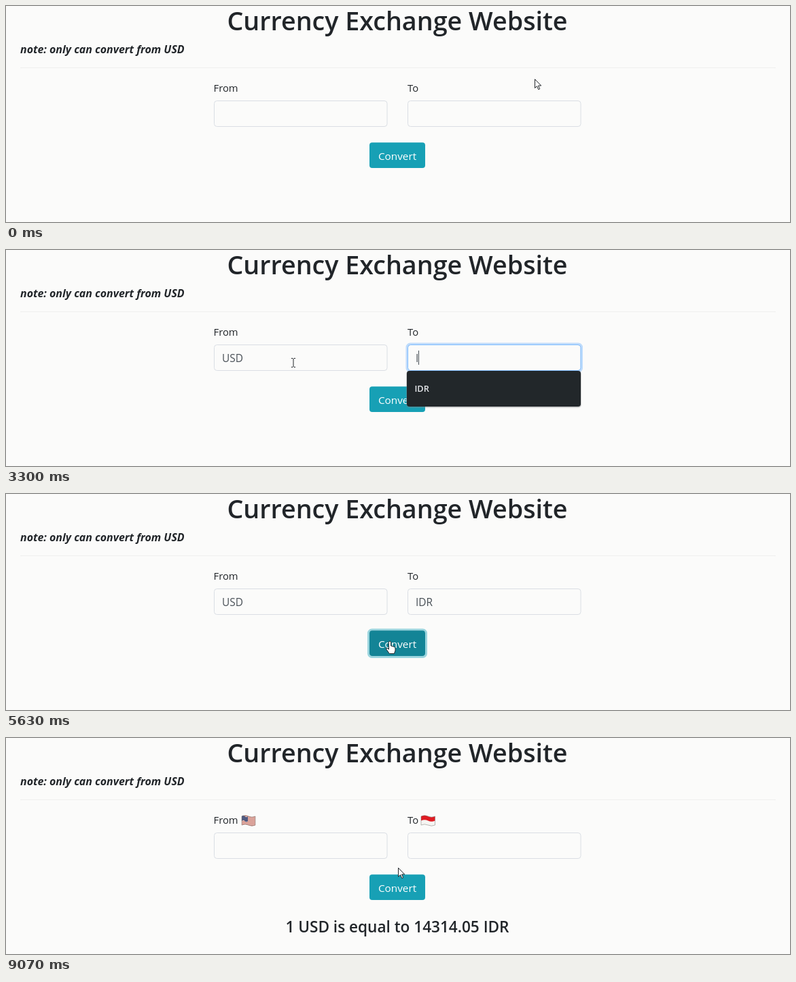
These frames come from a looping animation (1154 px wide and 320 px high, 9110 ms). An HTML page:

```html
<!DOCTYPE html>
<html lang="en">
<head>
<meta charset="utf-8">
<title>Currency Exchange</title>
<style>
  html, body { margin: 0; width: 100%; height: 100%; overflow: hidden; background: #fbfbfa; }
  svg { display: block; font: 14.8px "Open Sans", "Noto Sans", sans-serif; fill: #212529; }
  .title { font-size: 37.7px; font-weight: 600; text-anchor: middle; }
  .note { font-size: 15.95px; font-weight: 700; font-style: italic; }
  .result { font-size: 22.6px; font-weight: 600; text-anchor: middle; }
  .typed { font-size: 15.4px; fill: #495057; }
  .convert { font-size: 15.3px; fill: #fff; text-anchor: middle; }
  .item { font-size: 12.7px; font-weight: 600; fill: #e8eaed; }
  .box { fill: none; stroke: #dadee4; }
  .ring { fill: none; stroke-width: 3; }
  .cursor { fill: #fff; stroke: #212529; stroke-linejoin: round; }
</style>
</head>
<body>
<svg id="stage" width="1154" height="320" viewBox="0 0 1154 320">
  <text class="title" x="576" y="36">Currency Exchange Website</text>
  <text class="note" x="21" y="70">note: only can convert from USD</text>
  <path d="M21 91.5H1133" stroke="#efefee"/>
  <text x="305.5" y="127">From</text>
  <text x="591" y="127">To</text>
</svg>
<script>
const LOOP = 9110;
const OPEN = 850, TAB = 2900, CLICK = 5300, DONE = 7900;
const HOVER = [4530, 8830];
const BLINK = 530, FADE = 80;

const fields = [
  { x: 306, focus: [OPEN, TAB], keys: [1950, 2130, 2320], word: "USD" },
  { x: 591, focus: [TAB, CLICK], keys: [3200, 3430, 3650], word: "IDR" }
];
const lists = [
  { x: 305.5, from: OPEN, to: 1950, items: ["USD", "IDR", "MYR", "USA"] },
  { x: 305.5, from: 1950, to: 2320, items: ["USD", "USA"], fade: true },
  { x: 590, from: 3210, to: 3650, items: ["IDR"], fade: true }
];
// time, x, y of the pointer's hot spot
const track = [
  [0, 778, 108], [60, 778, 108], [740, 423, 167], [3850, 423, 167],
  [4530, 555, 207], [4700, 555, 207], [5150, 565, 218],
  [8600, 565, 218], [9030, 577, 192], [LOOP, 577, 192]
];

const stage = document.getElementById("stage");
function add(tag, attrs, parent = stage, text = "") {
  const el = document.createElementNS("http://www.w3.org/2000/svg", tag);
  for (const key in attrs) el.setAttribute(key, attrs[key]);
  el.textContent = text;
  parent.append(el);
  return el;
}
const set = (el, key, value) => el.setAttribute(key, value);
const clamp = v => Math.max(0, Math.min(1, v));
const within = (t, [a, b]) => t >= a && t < b;
const show = (el, on) => set(el, "visibility", on ? "visible" : "hidden");
// rises after a and falls after b, each over 150 ms
const pulse = (t, [a, b]) => clamp((t - a) / 150) - clamp((t - b) / 150);
const mix = (a, b, p) => `rgb(${a.map((v, i) => Math.round(v + (b[i] - v) * p))})`;

for (const f of fields) {
  add("rect", { class: "box", x: f.x + .5, y: 140.5, width: 254.5, height: 38, rx: 4 });
  f.ring = add("g", {});
  add("rect", { class: "ring", x: f.x - 1, y: 139, width: 257.5, height: 41, rx: 5, stroke: "#bfdcfb" }, f.ring);
  add("rect", { class: "box", x: f.x + .5, y: 140.5, width: 254.5, height: 38, rx: 4, style: "stroke:#80bdff" }, f.ring);
  f.text = add("text", { class: "typed", x: f.x + 12, y: 166 });
  f.caret = add("path", { stroke: "#495057" });
}

const buttonRing = add("rect", { class: "ring", x: 533.5, y: 201, width: 85, height: 40.5, rx: 5, stroke: "#9bd5de" });
const button = add("rect", { x: 535, y: 202.3, width: 82, height: 37.7, rx: 4 });
add("text", { class: "convert", x: 576, y: 228 }, stage, "Convert");

const outcome = add("g", {});
add("text", { class: "result", x: 576, y: 288 }, outcome, "1 USD is equal to 14314.05 IDR");
const wave = (x, y, w, h, fill) => add("path", {
  d: `M${x} ${y}q${w / 4} -2.4 ${w / 2} 0t${w / 2} 0v${h}q${-w / 4} 2.4 ${-w / 2} 0t${-w / 2} 0z`, fill
}, outcome);
wave(347, 116, 20, 13, "#f1eeea");
for (let i = 0; i < 7; i++) wave(347, 116 + i * 2, 20, 1, "#c4584a");
wave(347, 116, 9, 7, "#505a80");
wave(611, 116, 20.5, 13, "#f6f5f2");
wave(611, 116, 20.5, 6.5, "#e01b22");
for (const [x, w] of [[347, 20], [611, 20.5]]) {
  const edge = wave(x, 116, w, 13, "none");
  set(edge, "stroke", "#777470");
  set(edge, "stroke-width", .5);
}

for (const l of lists) {
  const n = l.items.length, height = 17 + 36 * n;
  l.group = add("g", {});
  l.middle = [l.x + 128, 179 + height / 2];
  add("rect", { x: l.x - 1, y: 179, width: 258, height: height + 2, rx: 5, fill: "#808488", opacity: .35 }, l.group);
  add("rect", { x: l.x, y: 179, width: 256, height, rx: 4, fill: "#22272a" }, l.group);
  l.items.forEach((name, i) =>
    add("text", { class: "item", x: l.x + 11.5, y: 209.5 + 36 * i }, l.group, name));
}

const cursor = add("path", { class: "cursor" });
const shapes = {
  arrow: "M.5 .5v13l3-2.8 2.2 5 2-.9-2.2-4.8h4.2z",
  beam: "M-3 -6.5h2l1 1 1-1h2M0 -5.5v11M-3 6.5h2l1-1 1 1h2",
  hand: "M-1.6 1q1.6-2 3.2 0v6l4.6 1.2q1.8 .7 1.8 2.8v3l-1.6 4.5h-7l-4.6-6.5q-.6-2.2 1.6-1.6l2 1.8z"
};

function pointer(t) {
  const i = Math.max(1, track.findIndex(k => k[0] > t));
  const [t0, x0, y0] = track[i - 1], [t1, x1, y1] = track[i];
  const p = (t - t0) / (t1 - t0), e = p * p * (3 - 2 * p);
  return [x0 + (x1 - x0) * e, y0 + (y1 - y0) * e];
}

function shapeAt(x, y) {
  if (x > 535 && x < 617 && y > 202 && y < 240) return "hand";
  const inField = y > 140 && y < 179 && fields.some(f => x > f.x && x < f.x + 255);
  return inField ? "beam" : "arrow";
}

function draw(t) {
  for (const f of fields) {
    const count = t < DONE ? f.keys.filter(k => k <= t).length : 0;
    f.text.textContent = f.word.slice(0, count);
    set(f.ring, "opacity", pulse(t, f.focus));
    const since = t - (count ? f.keys[count - 1] : f.focus[0]);
    const x = Math.round(f.x + 12 + f.text.getComputedTextLength()) + .5;
    set(f.caret, "d", `M${x} 149v21`);
    show(f.caret, within(t, f.focus) && since % (2 * BLINK) < BLINK);
  }
  for (const l of lists) {
    const out = l.fade ? clamp((t - l.to) / FADE) : +(t >= l.to);
    const [cx, cy] = l.middle;
    show(l.group, t >= l.from && out < 1);
    set(l.group, "opacity", 1 - out);
    set(l.group, "transform", `translate(${cx} ${cy}) scale(${1 - .06 * out}) translate(${-cx} ${-cy})`);
  }
  set(button, "fill", mix([23, 160, 181], [19, 132, 150], pulse(t, HOVER)));
  set(buttonRing, "opacity", pulse(t, [CLICK, DONE]));
  show(outcome, t >= DONE);

  const [x, y] = pointer(t), kind = shapeAt(x, y);
  set(cursor, "d", shapes[kind]);
  set(cursor, "fill", kind === "beam" ? "none" : "#fff");
  set(cursor, "transform", `translate(${Math.round(x)} ${Math.round(y)})`);
}

const start = performance.now();
(function tick() {
  draw((performance.now() - start) % LOOP);
  requestAnimationFrame(tick);
})();
</script>
</body>
</html>
```
